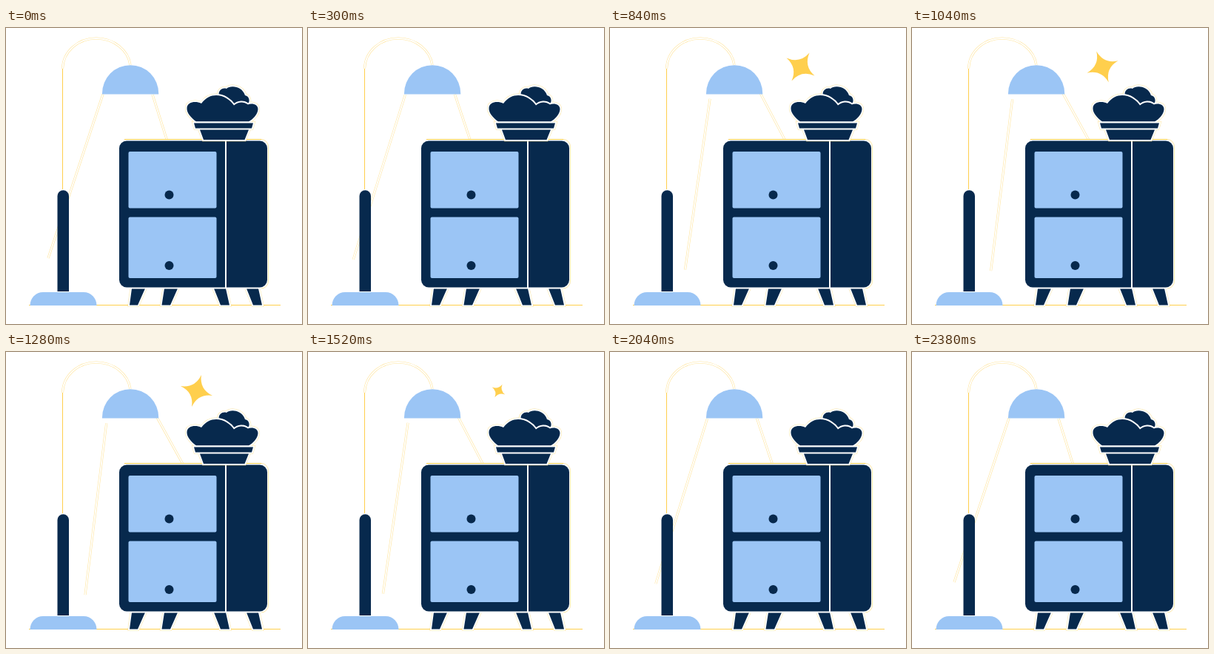
These frames come from a looping animation (400 px wide and 400 px high, 2.4 s). An HTML page:

```html
<!DOCTYPE html>
<html lang="en">
<head>
<meta charset="utf-8">
<title>Lamp and cabinet</title>
<style>
  html, body { margin: 0; width: 100%; height: 100%; overflow: hidden; background: #fff; }
  svg { display: block; width: 100vw; height: 100vh; }
  .navy { fill: #07294d; }
  .blue { fill: #9bc5f5; }
  .line { fill: none; stroke: #ffcf4d; }
  .faint { stroke-opacity: .5; }
  .halo { fill: none; stroke: #ffcf4d; stroke-opacity: .5; stroke-width: 5; }
  .gap { stroke: #fff; stroke-width: 4; paint-order: stroke; }
  /* pale strokes that show only as two thin edges */
  .tube { fill: none; stroke: #ffcf4d; stroke-opacity: .55; stroke-width: 3; }
  .core { fill: none; stroke: #fff; stroke-width: 1.8; }
</style>
</head>
<body>
<svg viewBox="0 0 400 400">
  <defs>
    <path id="rays" d="M131 89.5L57 311M198 90L268 311"/>
    <path id="arc" d="M76.5 55C77 32 97 14 122 14C146 14 165 30 168 50"/>
    <path id="legs" d="M170 352H188L178 374.5H167ZM214 352H232L222 374.5H210.5ZM281 352H297L302 374.5H290ZM325 352H341L346 374.5H334Z"/>
    <path id="backLeaf" d="M288 92C286 85 292 80 298 82C303 77 319 78 323 91C329 92 330 99 327 103L308 106Z"/>
    <path id="frontLeaf" d="M257 126.5C250 121 244 115 244.5 108C245 100 256 98 264 102C270 94 277 91 284 91C294 91 303 97 308 104.5C314 99.5 321 99 327 103.5C332 101 341 103 340.5 110C340 117 334 123 328 126.5Z"/>
    <path id="pot" d="M254 128.5H334L332 135.5H256ZM262 137.5H328L322.5 151H267Z"/>
  </defs>

  <!-- lamp -->
  <g id="beam">
    <use href="#rays" class="tube"/>
    <use href="#rays" class="core"/>
  </g>
  <use href="#arc" class="tube"/>
  <use href="#arc" class="core"/>
  <path class="line" d="M76.5 218V55"/>
  <path class="blue" d="M130 89.5V88.3A38.1 38.1 0 0 1 206.2 88.3V89.5Z"/>
  <path class="navy" d="M69.5 356V227A7.75 7.75 0 0 1 85 227V356Z"/>
  <path class="line" d="M31 374.5H371"/>
  <path class="blue" d="M32.5 375A17.5 18 0 0 1 50 357H105A17.5 18 0 0 1 122.5 375Z"/>

  <!-- cabinet -->
  <use href="#legs" class="halo"/>
  <use href="#legs" class="navy gap"/>
  <path class="line" d="M31 374.5H371" clip-path="inset(0)" stroke-opacity="0"/>
  <rect class="navy gap" x="153" y="152.5" width="200" height="198" rx="10"/>
  <path class="line" d="M160 150.5H345"/>
  <path class="line faint" d="M345 150.5A9.5 10 0 0 1 354.5 160.5V342A9.5 10 0 0 1 345 352"/>
  <path d="M297 152V351" stroke="#fff" stroke-width="2"/>
  <rect class="blue" x="165.5" y="167" width="119" height="76.5" rx="2"/>
  <rect class="blue" x="165.5" y="255.5" width="119" height="82.5" rx="2"/>
  <circle class="navy" cx="220.5" cy="225.5" r="6"/>
  <circle class="navy" cx="220.5" cy="321" r="6"/>

  <!-- plant -->
  <use href="#backLeaf" class="halo"/>
  <use href="#frontLeaf" class="halo"/>
  <use href="#pot" class="halo"/>
  <use href="#backLeaf" class="navy gap"/>
  <use href="#frontLeaf" class="navy gap"/>
  <use href="#pot" class="navy gap"/>

  <path id="star" fill="#ffcf4d" d="M0-22.5Q3-3 22.5 0Q3 3 0 22.5Q-3 3-22.5 0Q-3-3 0-22.5Z"/>
</svg>
<script>
  const LOOP = 2400;
  const beam = document.getElementById('beam');
  const star = document.getElementById('star');

  const progress = (t, from, to) => Math.min(1, Math.max(0, (t - from) / (to - from)));
  const sineInOut = u => (1 - Math.cos(Math.PI * u)) / 2;
  const sineOut = u => Math.sin(u * Math.PI / 2);

  // cubic-bezier(.6, 0, .4, 1), solved by bisection
  function swing(u) {
    let low = 0, high = 1, s = 0.5;
    for (let i = 0; i < 20; i++) {
      s = (low + high) / 2;
      const x = 1.8 * s * (1 - s) ** 2 + 1.2 * s * s * (1 - s) + s ** 3;
      if (x < u) low = s; else high = s;
    }
    return s * s * (3 - 2 * s);
  }

  function draw(now) {
    const t = now % LOOP;
    const angle = 11.5 * (swing(progress(t, 0, 1180)) - swing(progress(t, 1180, 2360)));
    beam.setAttribute('transform', `rotate(${-angle} 168 69.5)`);

    const size = sineOut(progress(t, 530, 830)) * sineOut(progress(t, 1610, 1310));
    const turn = 120 * sineInOut(progress(t, 490, 1500));
    star.setAttribute('transform', `translate(257.5 52.5) rotate(${turn}) scale(${size})`);
    star.setAttribute('visibility', size > 0 ? 'visible' : 'hidden');
  }

  const start = performance.now();
  function tick() {
    draw(performance.now() - start);
    requestAnimationFrame(tick);
  }
  tick();
</script>
</body>
</html>
```
